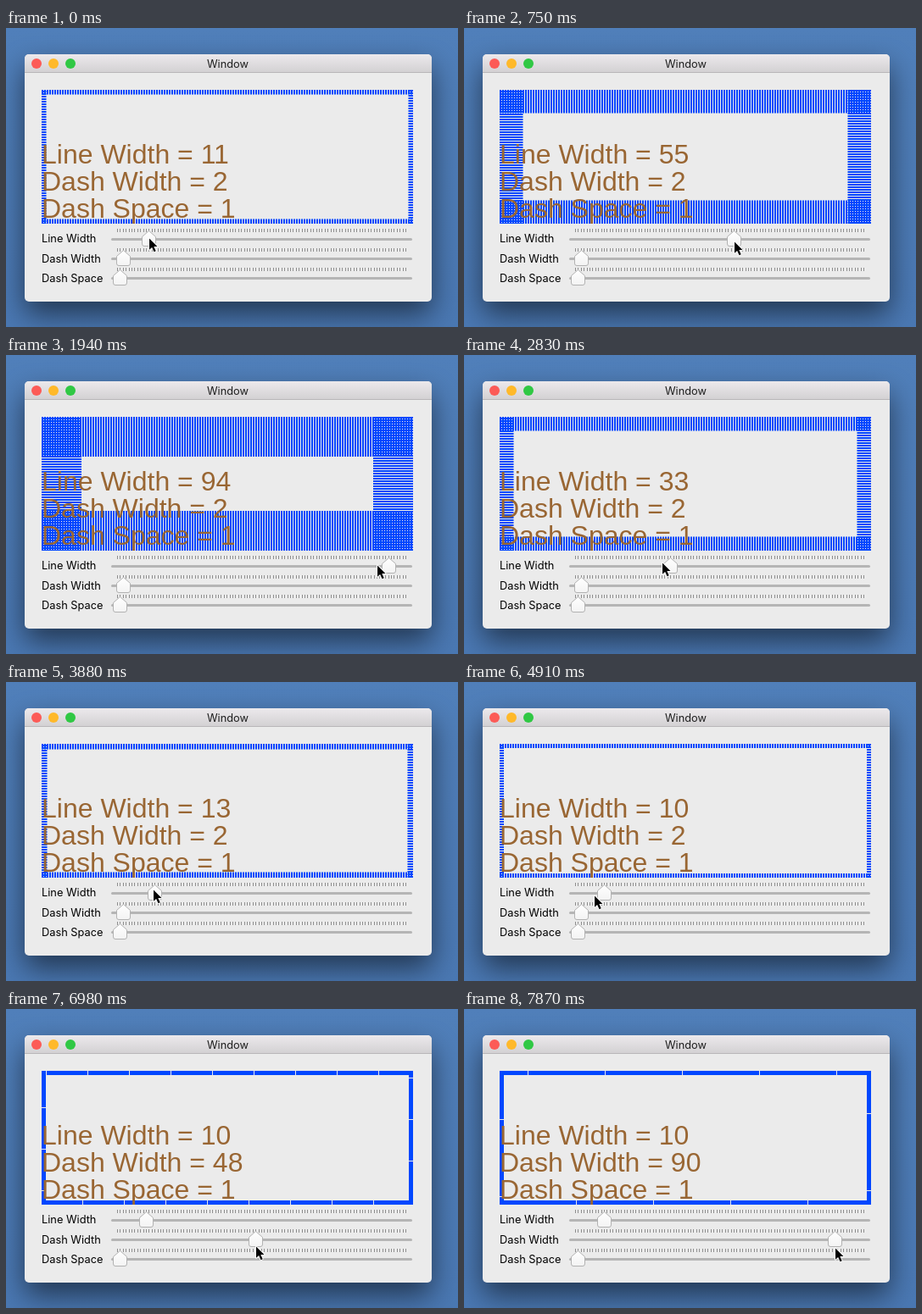
An HTML page with a canvas that plays this animation: 533x353 px, repeating every 8 s.

```html
<!DOCTYPE html>
<html lang="en">
<head>
<meta charset="utf-8">
<title>Dashed border sliders</title>
<style>
html, body { margin: 0; width: 100%; height: 100%; overflow: hidden; background: #4e7cb7; }
canvas { display: block; }
</style>
</head>
<body>
<canvas id="stage" width="533" height="353"></canvas>
<script>
const ctx = document.getElementById('stage').getContext('2d');
const LOOP = 8000;
const STEP = 148.4; // the picture moves on in even steps
const BOX = { l: 42, t: 73, r: 480, b: 231 };
const SPACE = 1;
const UI_FONT = '12.8px Inter, sans-serif';
const BIG_FONT = '32px "Liberation Sans", Arial, sans-serif';

// [step, slider value under the pointer]: line width up and down, then dash width
const LINE_END = 31, DASH_START = 38;
const DRAG = [
  [0, 11], [5, 55], [6, 55], [11, 99], [13, 94], [14, 90], [19, 33], [26, 13],
  [LINE_END, 10], [DASH_START, 2], [40, 2], [41, 6], [53, 90]
];
// [step, pointer height]
const HEIGHT = [[0, 247], [5, 251], [20, 243.5], [LINE_END, 243.5], [DASH_START, 269], [41, 266], [48, 281]];

function along(path, n) {
  const i = path.findIndex(p => p[0] > n);
  if (i < 0) return path[path.length - 1][1];
  const [n0, v0] = path[i - 1], [n1, v1] = path[i];
  return v0 + (v1 - v0) * (n - n0) / (n1 - n0);
}

const sliderX = value => 131.5 + 3.4 * value;

function poseAt(time) {
  const n = Math.floor(time / STEP);
  const value = along(DRAG, n);
  return {
    line: Math.round(along(DRAG, Math.min(n, LINE_END))),
    dash: Math.round(along(DRAG, Math.max(n, DASH_START))),
    // The pointer runs ahead of the thumb on the way left
    x: Math.floor(sliderX(Math.min(value, along(DRAG, n + 1)))),
    y: Math.round(along(HEIGHT, n))
  };
}

function gradient(y0, y1, top, bottom) {
  const g = ctx.createLinearGradient(0, y0, 0, y1);
  g.addColorStop(0, top);
  g.addColorStop(1, bottom);
  return g;
}

function polygon(points) {
  ctx.beginPath();
  points.forEach(([x, y]) => ctx.lineTo(x, y));
  ctx.closePath();
}

function roundBox(x, y, w, h, radius, fill) {
  ctx.beginPath();
  ctx.roundRect(x, y, w, h, radius);
  ctx.fillStyle = fill;
  ctx.fill();
}

function text(str, x, y, font, color, align = 'left') {
  ctx.font = font;
  ctx.fillStyle = color;
  ctx.textAlign = align;
  ctx.fillText(str, x, y);
}

function drawWindow() {
  ctx.fillStyle = gradient(0, 353, '#507fba', '#4a78b3');
  ctx.fillRect(0, 0, 533, 353);

  ctx.save();
  ctx.shadowColor = 'rgba(0,0,0,.55)';
  ctx.shadowBlur = 34;
  ctx.shadowOffsetY = 15;
  roundBox(22, 31, 480, 292, 5, '#ebebeb');
  ctx.restore();

  roundBox(22, 31, 480, 22, [5, 5, 0, 0], gradient(31, 53, '#ece9ec', '#d2d0d2'));
  ctx.fillStyle = '#b8b6b8';
  ctx.fillRect(22, 52, 480, 1);

  ['#fc5b57', '#ffb92a', '#30c844'].forEach((color, i) =>
    roundBox(30 + 20 * i, 36, 12, 12, 6, color));
  text('Window', 261.5, 47, UI_FONT, '#1e1e1e', 'center');
}

function drawDashedBox(line, dash) {
  const { l, t, r, b } = BOX;
  ctx.save();
  ctx.beginPath();
  ctx.rect(l, t, r - l, b - t);
  ctx.clip();
  ctx.setLineDash([dash, SPACE]);
  ctx.lineWidth = line;
  ctx.strokeStyle = '#0047ff';
  polygon([[l, b], [r, b], [r, t], [l, t]]);
  ctx.stroke();
  ctx.restore();

  ['Line Width = ' + line, 'Dash Width = ' + dash, 'Dash Space = ' + SPACE]
    .forEach((s, i) => text(s, l, 160 + 32 * i, BIG_FONT, '#996633'));
}

function drawSlider(label, row, value) {
  const y = 249 + 23 * row;
  text(label, 42, Math.round(253 + 23.5 * row), UI_FONT, '#000');
  ctx.fillStyle = '#8e8e8e';
  for (let i = 0; i <= 100; i++)
    ctx.fillRect(Math.floor(sliderX(i)), y - 12, 1, 4);
  roundBox(124, y - 1, 355, 3, 1.5, '#b5b5b5');

  const x = Math.floor(sliderX(value)) + .5, top = y - 9.5, bottom = y + 8.5;
  ctx.beginPath();
  ctx.moveTo(x, top);
  ctx.lineTo(x + 8, y - 2.5);
  ctx.arcTo(x + 8, bottom, x, bottom, 2.5);
  ctx.arcTo(x - 8, bottom, x - 8, y - 2.5, 2.5);
  ctx.lineTo(x - 8, y - 2.5);
  ctx.closePath();
  ctx.fillStyle = gradient(top, bottom, '#ffffff', '#f3f3f3');
  ctx.fill();
  ctx.lineWidth = 1;
  ctx.strokeStyle = '#b2b2b2';
  ctx.stroke();
}

function drawPointer(x, y) {
  ctx.save();
  ctx.translate(x + 1, y + 1.5);
  ctx.scale(.92, .92);
  polygon([[0, 0], [0, 14.5], [3.4, 11.4], [6, 17], [8.4, 16], [5.8, 10.4], [10.3, 10.2]]);
  ctx.lineJoin = 'round';
  ctx.lineWidth = 2;
  ctx.strokeStyle = '#fff';
  ctx.stroke();
  ctx.fillStyle = '#000';
  ctx.fill();
  ctx.restore();
}

const start = performance.now();
function frame() {
  const { line, dash, x, y } = poseAt((performance.now() - start) % LOOP);
  drawWindow();
  drawDashedBox(line, dash);
  drawSlider('Line Width', 0, line);
  drawSlider('Dash Width', 1, dash);
  drawSlider('Dash Space', 2, SPACE);
  drawPointer(x, y);
  requestAnimationFrame(frame);
}
frame();
</script>
</body>
</html>
```
